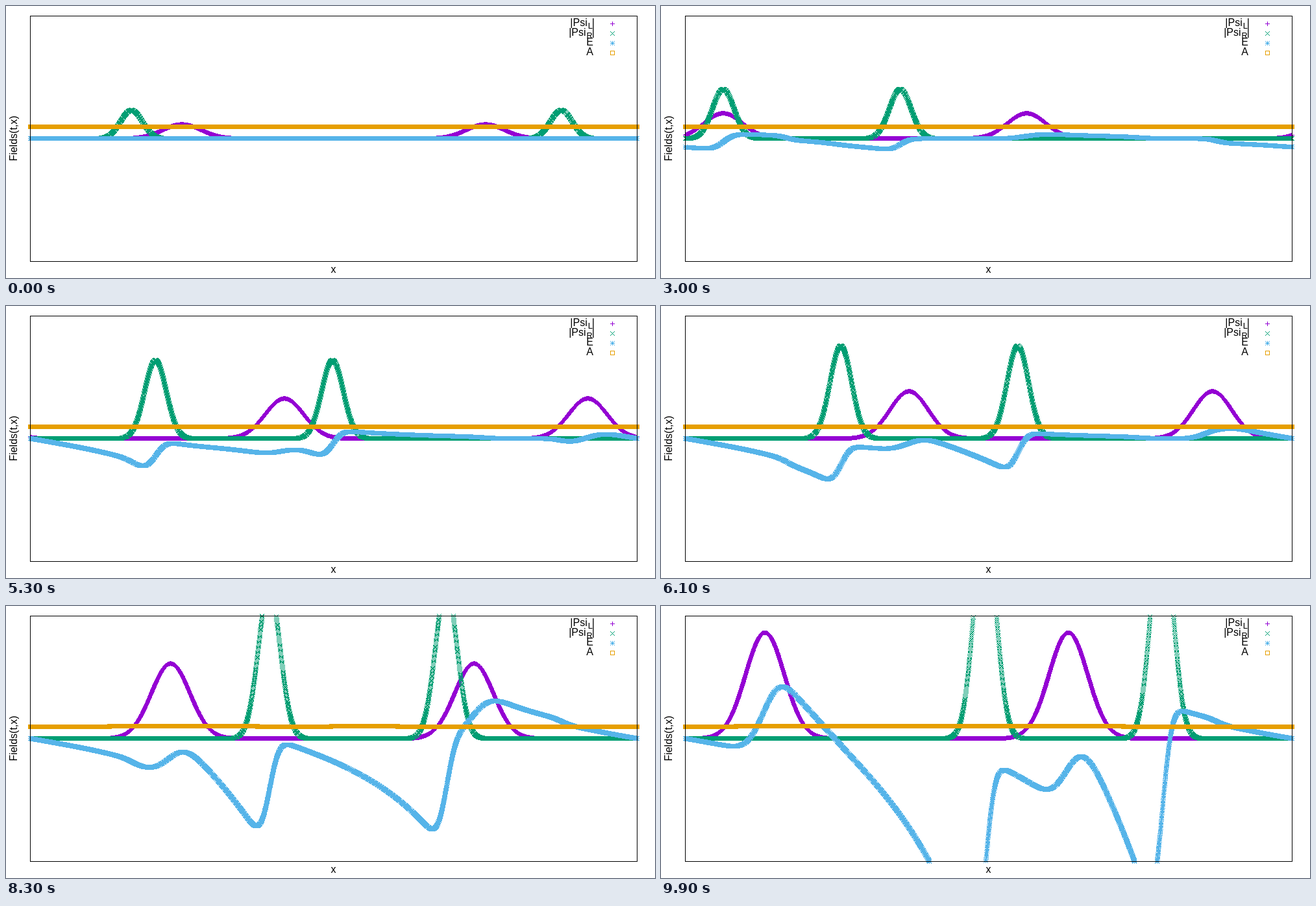
An HTML page with a canvas that plays this animation: 1000x420 px, repeating every 10000 ms.

```html
<!DOCTYPE html>
<html lang="en">
<head>
<meta charset="utf-8">
<title>Fields(t,x)</title>
<style>
  html, body { margin: 0; width: 100%; height: 100%; overflow: hidden; background: #fff; }
  svg, canvas { position: absolute; left: 0; top: 0; width: 1000px; height: 420px; }
  text { font: 16px "Liberation Sans", Arial, sans-serif; }
  .sub { font-size: 12.8px; }
</style>
</head>
<body>
<canvas id="plot" width="1000" height="420"></canvas>
<svg viewBox="0 0 1000 420">
  <rect x="37.5" y="15.5" width="935" height="379" fill="none" stroke="#000" shape-rendering="crispEdges"/>
  <text x="504.5" y="412" text-anchor="middle">x</text>
  <text transform="translate(17 204.5) rotate(-90)" text-anchor="middle">Fields(t,x)</text>
  <g text-anchor="end">
    <text x="907" y="31">|Psi<tspan class="sub" dx="1" dy="4">L</tspan><tspan dx="-1" dy="-4">|</tspan></text>
    <text x="907" y="46">|Psi<tspan class="sub" dx="1" dy="4">R</tspan><tspan dx="-1" dy="-4">|</tspan></text>
    <text x="905" y="61">E</text>
    <text x="905" y="76">A</text>
  </g>
</svg>
<script>
const ctx = document.getElementById('plot').getContext('2d');
const LEFT = 37, WIDTH = 935, TOP = 15, BOTTOM = 394, ZERO = 204.4;
const POINTS = 4000, FRAMES = 100, STEP = 0.1;
const SPEED = WIDTH / 16;      // pulse speed, px per second
const CURRENT = 6.46e-4;       // change of E per step and unit of density
const COUPLING = 1.4e-4;       // change of A per step and unit of E

// Two travelling, growing Gaussians on a periodic axis.
const right = { dir: 1, starts: [1 / 6, 7 / 8], sigma: 16.7, amp: 44, rate: 0.174, gain: 0.0032 };
const left = { dir: -1, starts: [1 / 4, 3 / 4], sigma: 29.7, amp: 22, rate: 0.187, gain: 0.0016 };

function psi(wave, x, t) {
  const height = wave.amp * Math.exp(wave.rate * t + wave.gain * t * t);
  let sum = 0;
  for (const start of wave.starts) {
    let d = x - start * WIDTH - wave.dir * SPEED * t;
    d -= WIDTH * Math.round(d / WIDTH);
    sum += Math.exp(-d * d / (2 * wave.sigma ** 2));
  }
  return height * sum;
}

const xs = Float64Array.from({ length: POINTS }, (_, i) => i * WIDTH / (POINTS - 1));

// Integrate E and A over the whole loop.
function integrate() {
  const history = [];
  let E = new Float64Array(POINTS);
  let A = new Float64Array(POINTS).fill(18.78);
  for (let n = 0; n < FRAMES; n++) {
    history.push({ E, A });
    const mid = (n + 0.5) * STEP;
    const nextE = E.map((e, i) =>
      e + CURRENT * (psi(left, xs[i], mid) ** 2 - psi(right, xs[i], mid) ** 2));
    A = A.map((a, i) => a - COUPLING * (E[i] + nextE[i]) / 2);
    E = nextE;
  }
  return history;
}

function marker(color, covers) {
  const sprite = document.createElement('canvas');
  sprite.width = sprite.height = 7;
  const c = sprite.getContext('2d');
  c.fillStyle = color;
  for (let x = -3; x <= 3; x++)
    for (let y = -3; y <= 3; y++)
      if (covers(Math.abs(x), Math.abs(y))) c.fillRect(x + 3, y + 3, 1, 1);
  return sprite;
}

const plus = (x, y) => x === 0 || y === 0;
const cross = (x, y) => x === y;
const markers = [
  marker('#9400d3', plus),
  marker('#009e73', cross),
  marker('#56b4e9', (x, y) => plus(x, y) || cross(x, y)),
  marker('#e69f00', (x, y) => Math.max(x, y) === 3)
];

const history = integrate();

function draw(n) {
  const t = n * STEP, { E, A } = history[n];
  const curves = [i => psi(left, xs[i], t), i => psi(right, xs[i], t), i => E[i], i => A[i]];
  ctx.clearRect(0, 0, 1000, 420);
  curves.forEach((value, k) => {
    ctx.drawImage(markers[k], 931, 24 + 15 * k);
    let lastX, lastY;
    for (let i = 0; i < POINTS; i++) {
      const x = Math.round(LEFT + xs[i]), y = Math.round(ZERO - value(i));
      const repeated = x === lastX && y === lastY;
      if (!repeated && y >= TOP && y <= BOTTOM) ctx.drawImage(markers[k], x - 3, y - 3);
      lastX = x;
      lastY = y;
    }
  });
}

const begin = performance.now();
let shown = -1;
function tick() {
  const n = Math.floor((performance.now() - begin) / (STEP * 1000)) % FRAMES;
  if (n !== shown) draw(shown = n);
  requestAnimationFrame(tick);
}
tick();
</script>
</body>
</html>
```
